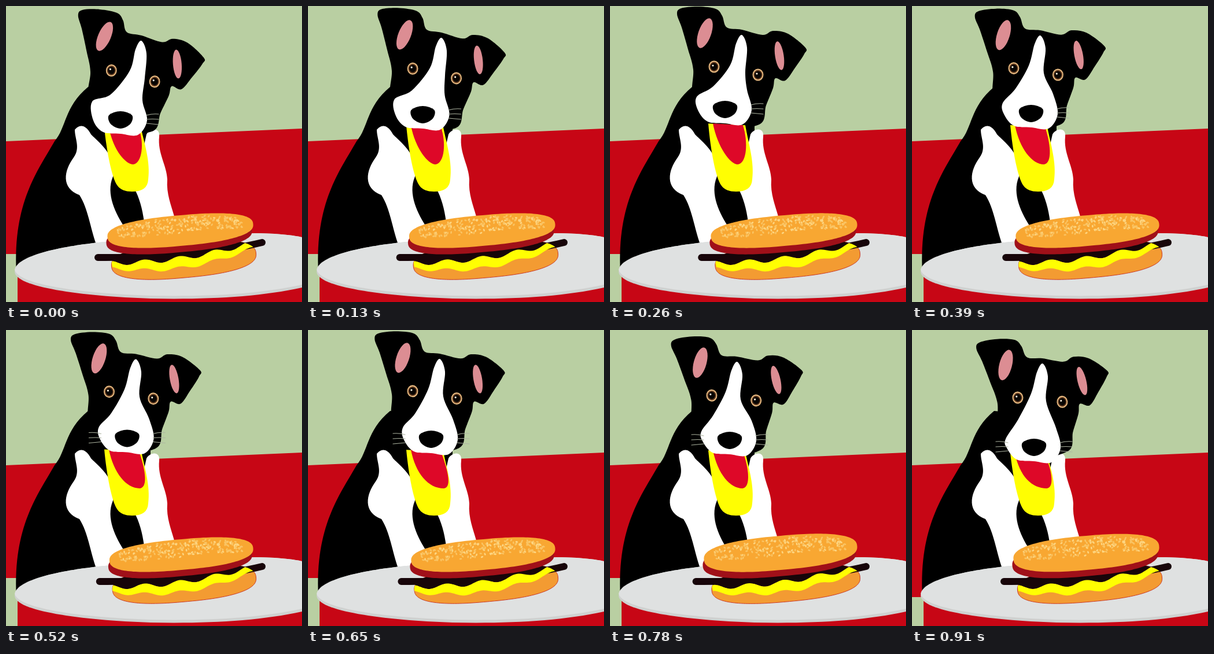
An HTML page with a canvas that plays this animation: 512x512 px, repeating every 1040 ms.

```html
<!DOCTYPE html>
<html lang="en">
<head>
<meta charset="utf-8">
<title>Dog and sandwich</title>
<style>
html, body { margin: 0; width: 100%; height: 100%; overflow: hidden; }
canvas { display: block; width: 512px; height: 512px; }
</style>
</head>
<body>
<canvas id="stage" width="512" height="512"></canvas>
<script>
const ctx = document.getElementById('stage').getContext('2d');
const STEP = 130, TAU = Math.PI * 2;
const GREEN = '#b9cfa2', RED = '#c70615', WHITE = '#fff', YELLOW = '#fffe02', PINK = '#dc8d93';

// Forehead and nose positions, head tilt in degrees, sandwich edges, lower edge of the wall.
const pose = (browX, browY, tilt, noseX, noseY, bunLeft, bunTop, wall = 429) =>
  ({ browX, browY, tilt, noseX, noseY, bunLeft, bunTop, wall });
const between = (a, b) =>
  Object.fromEntries(Object.keys(a).map(k => [k, (a[k] + b[k]) / 2]));

const lean = pose(234, 60, 4, 198, 198, 175, 360);
const lift = pose(228, 50, 0, 199, 180, 174, 360);
const pant = pose(222, 51, -2, 206, 187, 179, 360);
const front = pose(228, 50, -1, 213, 190, 178, 360);
const reach = pose(220, 55, -4, 207, 192, 162, 354);
const bow = pose(226, 58, -5, 211, 204, 175, 354, 462);
const poses = [lean, between(lean, lift), lift, pant, between(pant, front), front, reach, bow];

function path(d, fill) {
  ctx.fillStyle = fill;
  ctx.fill(new Path2D(d));
}

function oval(x, y, rx, ry, fill, turn = 0) {
  ctx.beginPath();
  ctx.ellipse(x, y, rx, ry, turn, 0, TAU);
  ctx.fillStyle = fill;
  ctx.fill();
}

// Closed smooth curve through a few points.
function blob(points, fill) {
  const n = points.length, at = i => points[(i + n) % n];
  ctx.beginPath();
  ctx.moveTo(...points[0]);
  for (let i = 0; i < n; i++) {
    const [a, b, c, d] = [at(i - 1), at(i), at(i + 1), at(i + 2)];
    ctx.bezierCurveTo(b[0] + (c[0] - a[0]) / 6, b[1] + (c[1] - a[1]) / 6,
      c[0] - (d[0] - b[0]) / 6, c[1] - (d[1] - b[1]) / 6, ...c);
  }
  ctx.fillStyle = fill;
  ctx.fill();
}

// Tilted superellipse.
function loaf(x, y, rx, ry, tilt) {
  const shape = new Path2D(), round = v => Math.sign(v) * Math.abs(v) ** 0.8;
  for (let a = 0; a < TAU; a += 0.04) {
    const u = rx * round(Math.cos(a)), v = ry * round(Math.sin(a));
    shape.lineTo(x + u * Math.cos(tilt) - v * Math.sin(tilt), y + u * Math.sin(tilt) + v * Math.cos(tilt));
  }
  shape.closePath();
  return shape;
}

function room(p) {
  ctx.fillStyle = GREEN;
  ctx.fillRect(0, 0, 512, 512);
  path(`M0 234 L512 212 V512 H20 V${p.wall} H0 Z`, RED);
}

function table() {
  const top = 'C20 432 90 416 170 408 L430 393 C470 393 500 397 512 400';
  path('M20 470 H512 V512 H20 Z', RED);
  path(`M15 459 ${top} V487 C440 503 350 508 250 506 C130 502 14 486 15 459 Z`, '#cfd1d0');
  path(`M15 456 ${top} V482 C440 498 350 503 250 501 C130 497 20 482 15 456 Z`, '#dfe1e1');
}

function body() {
  path('M142 140 C100 175 105 210 84 234 C55 285 12 340 18 460 H250 V150 Z', '#000');
  path('M119 214 C127 204 138 205 147 222 C165 240 190 258 185 295 C172 325 190 360 206 384 ' +
    'C190 410 165 425 156 412 C146 385 142 350 127 327 C95 315 100 285 117 262 C129 245 119 230 119 214 Z', WHITE);
  path('M243 222 C250 210 267 210 265 226 C262 255 278 275 279 300 C277 325 286 345 291 364 ' +
    'L239 374 C236 350 230 330 222 316 Z', WHITE);
}

function inHeadSpace(p, paint) {
  ctx.save();
  ctx.translate(p.browX, p.browY);
  ctx.rotate(p.tilt * Math.PI / 180);
  paint();
  ctx.restore();
}

function skull() {
  blob([[-93, 25], [-104, -13], [-112, -36], [-105, -46], [-75, -49], [-45, -45], [-34, -33], [-26, -13],
    [0, -9], [36, 0], [54, -7], [80, -2], [110, 22], [108, 33], [92, 57], [75, 79], [58, 75],
    [54, 92], [42, 122], [30, 155], [-40, 160], [-83, 112], [-84, 60]], '#000');
  oval(-64, -3, 11, 27, PINK, 0.34);
  oval(65, 36, 7.5, 25, PINK, -0.15);
}

function eye(x, y) {
  oval(x, y, 9.5, 10.5, '#e3b67e');
  oval(x, y, 7.5, 8.2, '#5d371d');
  oval(x, y, 5.8, 6.2, '#080503');
  oval(x - 2, y - 2, 1.6, 1.6, '#fff4df');
}

function tongue(p) {
  const y = 211 + (p.noseY - 192) * 0.4, tip = p.noseX + 22;
  path(`M170 ${y - 3} C174 250 183 298 193 311 Q200 321 218 321 Q245 321 246 300 C250 270 240 240 234 ${y} Z`, YELLOW);
  path(`M178 ${y - 3} C186 ${y + 38} 208 274 ${tip} 274 C${tip + 16} 272 239 235 230 ${y} Z`, '#de0828');
}

function muzzle(p) {
  const { browX: bx, browY: by, noseX: nx, noseY: ny } = p;
  const cheek = ny - 13 - (p.tilt + 10) ** 2 / 10;
  blob([[bx, by], [bx + 9, by + 22], [bx + 6, by + 65], [nx + 38, ny - 35], [nx + 46, ny],
    [nx + 30, ny + 25], [nx, ny + 23], [nx - 30, ny + 20], [nx - 47, ny], [nx - 49, cheek],
    [(nx + bx) / 2 - 35, (ny + by) / 2 + 24], [bx - 20, by + 52], [bx - 10, by + 15]], WHITE);
  blob([[nx - 20, ny - 9], [nx, ny - 16], [nx + 20, ny - 9], [nx + 17, ny + 6], [nx, ny + 14], [nx - 17, ny + 6]], '#000');
}

function whiskers({ noseX, noseY }, sides) {
  ctx.strokeStyle = '#aeb5a2';
  ctx.lineWidth = 1.2;
  for (const side of sides) {
    for (let i = 0; i < 3; i++) {
      const x = noseX + side * 45, y = noseY - 9 + i * 7;
      ctx.beginPath();
      ctx.moveTo(x, y);
      ctx.quadraticCurveTo(x + side * 10, y - 3 + i * 2, x + side * 21, y - 2 + i * 2);
      ctx.stroke();
    }
  }
}

function filling(left, right, barLeft) {
  const mid = t => 445 - 37 * t;
  const wave = (x, bump, size) => {
    const t = (x - left) / (right - left);
    return mid(t) + bump * Math.sin(Math.PI * t) + size * Math.cos((x - 330) / 60 * TAU);
  };
  const bread = loaf((left + right) / 2, 439, (right - left) / 2, 31, -0.09);
  ctx.fillStyle = '#f39b32';
  ctx.fill(bread);
  ctx.strokeStyle = '#c93a28';
  ctx.lineWidth = 1;
  ctx.stroke(bread);

  ctx.strokeStyle = '#170509';
  ctx.lineWidth = 12;
  ctx.lineCap = 'round';
  ctx.beginPath();
  ctx.moveTo(barLeft + 6, 435);
  ctx.quadraticCurveTo(330, 436, 443, 409);
  ctx.stroke();

  ctx.save();
  ctx.clip(bread);
  const cheese = new Path2D(), shade = new Path2D(`M${right} 395 H${left}`);
  for (let x = left; x <= right; x += 3) {
    const y = wave(x, 9, 4);
    shade.lineTo(x, y);
    cheese.lineTo(x, y);
  }
  for (let x = right; x >= left; x -= 3) cheese.lineTo(x, wave(x, 17, 3) + 9);
  ctx.fillStyle = '#170509';
  ctx.fill(shade);
  ctx.fillStyle = YELLOW;
  ctx.fill(cheese);
  ctx.restore();
}

function seeds(x, y, rx, ry, tilt) {
  let seed = 7;
  const random = () => (seed = seed * 16807 % 2147483647) / 2147483647;
  ctx.save();
  ctx.translate(x, y);
  ctx.rotate(tilt);
  for (let i = 0; i < 230; i++) {
    const u = random() * 1.7 - 0.85, v = random();
    const height = Math.sqrt(1 - u * u);
    oval(u * rx, ry * (0.15 - v * (height + 0.05)), 2.3, 1.4, i % 3 ? '#fac463' : '#fdd581', random() * 3);
  }
  ctx.restore();
}

function sandwich({ bunLeft, bunTop }) {
  const right = 428, shift = bunLeft - 175;
  filling(182 + shift * 0.5, 433, 153 + shift * 0.8);
  const x = (bunLeft + right) / 2, rx = (right - bunLeft) / 2;
  const y = (bunTop + 417) / 2, ry = (417 - bunTop) / 2 - 2, tilt = -0.09;
  ctx.fillStyle = '#a01019';
  ctx.fill(loaf(x - 2, y + 11, rx, ry, tilt));
  const bun = loaf(x, y, rx, ry, tilt);
  ctx.fillStyle = '#f8a732';
  ctx.fill(bun);
  seeds(x, y, rx, ry, tilt);
}

function draw(now) {
  const index = Math.floor(now / STEP) % poses.length, p = poses[index];
  room(p);
  body();
  inHeadSpace(p, skull);
  tongue(p);
  muzzle(p);
  whiskers(p, index < 4 ? [1] : [-1, 1]);
  inHeadSpace(p, () => {
    eye(-48, 55);
    eye(28, 69);
  });
  table();
  sandwich(p);
}

const start = performance.now();
function tick() {
  draw(performance.now() - start);
  requestAnimationFrame(tick);
}
tick();
</script>
</body>
</html>
```
